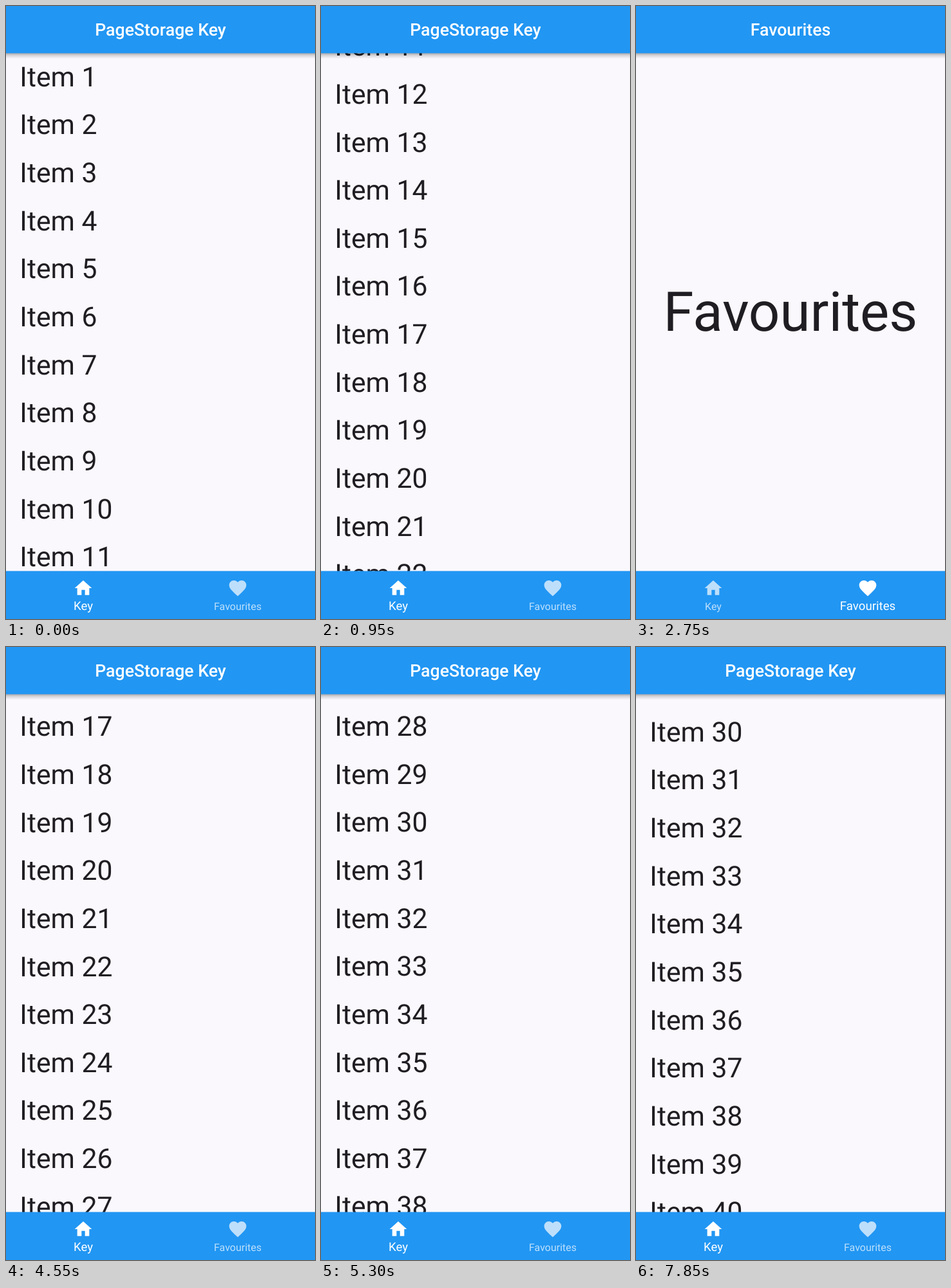
Write an HTML page that moves like this. It is 480 px wide and 953 px high and loops after 8 s.

```html
<!DOCTYPE html>
<html lang="en">
<head>
<meta charset="utf-8">
<title>PageStorage Key</title>
<style>
  html, body { margin: 0; width: 100%; height: 100%; overflow: hidden; background: #faf8fc; }
  svg { display: block; width: 100%; height: 100%; }
  text { font-family: Roboto, sans-serif; text-rendering: geometricPrecision; }
  #list text { font-size: 42.67px; fill: #201d22; }
  #page { font-size: 85.33px; fill: #201d22; text-anchor: middle; }
  #title { font-size: 26.67px; font-weight: 500; fill: #fff; text-anchor: middle; }
  .tab { fill: #fff; }
  .tab text { font-size: 18.67px; text-anchor: middle; }
</style>
</head>
<body>
<svg viewBox="0 0 480 953">
  <defs>
    <linearGradient id="shade" x2="0" y2="1">
      <stop offset="0" stop-color="#000" stop-opacity=".34"/>
      <stop offset=".4" stop-color="#000" stop-opacity=".15"/>
      <stop offset="1" stop-color="#000" stop-opacity="0"/>
    </linearGradient>
  </defs>
  <rect width="480" height="953" fill="#faf8fc"/>
  <g id="list"></g>
  <text id="page" x="240" y="505">Favourites</text>
  <rect y="73" width="480" height="9" fill="url(#shade)"/>
  <rect width="480" height="73.4" fill="#2196f3"/>
  <text id="title" x="240" y="46"></text>
  <rect y="878.4" width="480" height="74.6" fill="#2196f3"/>
  <g class="tab">
    <path transform="translate(104 889) scale(1.3333)" d="M10 20v-6h4v6h5v-8h3L12 3 2 12h3v8z"/>
    <text y="-4.5">Key</text>
  </g>
  <g class="tab">
    <path transform="translate(344 889) scale(1.3333)" d="M12 21.35l-1.45-1.32C5.4 15.36 2 12.28 2 8.5 2 5.42 4.42 3 7.5 3c1.74 0 3.41.81 4.5 2.09C13.09 3.81 14.76 3 16.5 3 19.58 3 22 5.42 22 8.5c0 3.78-3.4 6.86-8.55 11.54L12 21.35z"/>
    <text y="-4.5">Favourites</text>
  </g>
</svg>
<script>
const LOOP = 8000, STEP = 50, ROW = 74.65, ITEMS = 46;
const $ = id => document.getElementById(id);
const list = $('list'), page = $('page'), title = $('title');
const tabs = [...document.querySelectorAll('.tab')];

for (let i = 0; i < ITEMS; i++) {
  const row = document.createElementNS('http://www.w3.org/2000/svg', 'text');
  row.setAttribute('x', 21.33);
  row.setAttribute('y', 124.8 + i * ROW);
  row.textContent = 'Item ' + (i + 1);
  list.append(row);
}

// A finger drag that turns into a decelerating fling.
const swipes = [
  { start: 370, release: 600, end: 1830, from: 0, thrown: 330, to: 1180, pull: 1.2 },
  { start: 4500, release: 4750, end: 5780, from: 1180, thrown: 1292, to: 2143, pull: 3 }
];
// Tab taps: the page swaps at once, the bar blends over dur.
const taps = [
  { at: 2450, dur: 300, tab: 1 },
  { at: 3950, dur: 50, tab: 0 },
  { at: 6400, dur: 350, tab: 1 },
  { at: 7450, dur: 250, tab: 0 }
];

const clamp = v => Math.min(1, Math.max(0, v));
const mix = (a, b, k) => a + (b - a) * k;

// cubic-bezier(.4, 0, .2, 1)
function ease(x) {
  if (x <= 0 || x >= 1) return clamp(x);
  let lo = 0, hi = 1, s;
  for (let i = 0; i < 20; i++) {
    s = (lo + hi) / 2;
    const bx = 1.2 * s * (1 - s) ** 2 + 0.6 * s * s * (1 - s) + s ** 3;
    if (bx < x) lo = s; else hi = s;
  }
  return s * s * (3 - 2 * s);
}

function scrollAt(t) {
  let y = 0;
  for (const s of swipes) {
    if (t <= s.start) break;
    y = t < s.release
      ? mix(s.from, s.thrown, ((t - s.start) / (s.release - s.start)) ** s.pull)
      : mix(s.to, s.thrown, (1 - clamp((t - s.release) / (s.end - s.release))) ** 2.358);
  }
  return y;
}

function render(t) {
  const tap = taps.filter(p => p.at <= t).pop();
  const tab = tap ? tap.tab : 0;
  const k = tap ? ease(clamp((t - tap.at) / tap.dur)) : 1;

  list.setAttribute('transform', `translate(0 ${-scrollAt(t)})`);
  list.style.display = tab ? 'none' : '';
  page.style.display = tab ? '' : 'none';
  title.textContent = tab ? 'Favourites' : 'PageStorage Key';

  tabs.forEach((el, i) => {
    const on = i === tab ? k : 1 - k;
    el.setAttribute('opacity', mix(0.7, 1, on));
    el.lastElementChild.setAttribute('transform',
      `translate(${120 + 240 * i} 943) scale(${mix(6 / 7, 1, on)})`);
  });
}

const began = performance.now();
function tick() {
  const t = (performance.now() - began) % LOOP;
  render(Math.floor(t / STEP) * STEP);
  requestAnimationFrame(tick);
}
tick();
</script>
</body>
</html>
```
